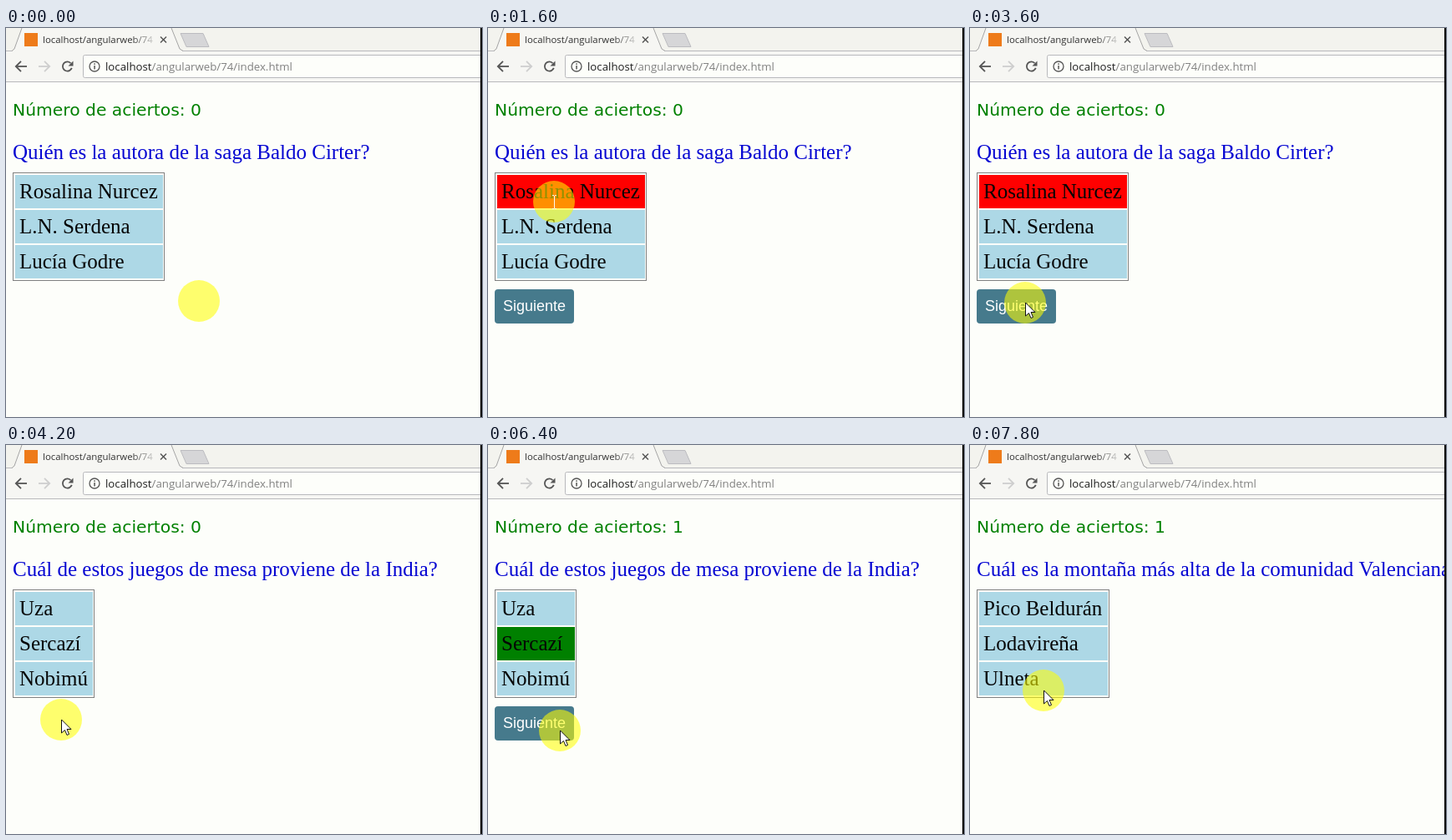
Write an HTML page with a canvas that moves like this. It is 570 px wide and 466 px high and loops after 8 s.

```html
<!DOCTYPE html>
<html lang="es">
<head>
<meta charset="utf-8">
<title>Quiz</title>
<style>
html, body { margin: 0; width: 100%; height: 100%; overflow: hidden; background: #fdfefa; }
canvas { display: block; width: 570px; height: 466px; }
</style>
</head>
<body>
<canvas id="stage" width="570" height="466"></canvas>
<script>
const ctx = document.getElementById('stage').getContext('2d');
const LOOP = 8000, STEP = 200;
const PAGE = '#fdfefa', BAR = '#f6f6f3', STRIP = '#f3f3ee', CELL = '#add8e6';
const LINE = '#b8b8bc', ICON = '#555555';
const SERIF = '25px "Liberation Serif", "Times New Roman", serif';
const UI = '"Open Sans", "Noto Sans", sans-serif';

const quiz = [
  { from: 0, answered: 1400, pick: 0, color: '#ff0000', width: 182,
    ask: 'Quién es la autora de la saga Baldo Cirter?',
    options: ['Rosalina Nurcez', 'L.N. Serdena', 'Lucía Godre'] },
  { from: 4200, answered: 5800, pick: 1, color: '#008000', width: 98,
    ask: 'Cuál de estos juegos de mesa proviene de la India?',
    options: ['Uza', 'Sercazí', 'Nobimú'] },
  { from: 7000, answered: Infinity, pick: -1, width: 159,
    ask: 'Cuál es la montaña más alta de la comunidad Valenciana?',
    options: ['Pico Beldurán', 'Lodavireña', 'Ulneta'] }
];

// Pointer path: time, x, y
const path = [
  [0, 231, 327], [200, 200, 310], [600, 95, 244], [1000, 92, 240],
  [1400, 79, 208], [2200, 79, 208], [2800, 66, 329], [4200, 66, 329],
  [5000, 77, 250], [5800, 77, 250], [6000, 86, 358], [6200, 86, 358],
  [6400, 86, 342], [7200, 86, 342], [7800, 88, 294], [8000, 88, 294]
];

function pointerAt(t) {
  let i = 0;
  while (i < path.length - 2 && t >= path[i + 1][0]) i++;
  const [t0, x0, y0] = path[i], [t1, x1, y1] = path[i + 1];
  const k = (t - t0) / (t1 - t0), e = k * k * (3 - 2 * k);
  return [x0 + (x1 - x0) * e, y0 + (y1 - y0) * e];
}

function rect(x, y, w, h, color) {
  ctx.fillStyle = color;
  ctx.fillRect(x, y, w, h);
}

function text(str, x, y, font, color) {
  ctx.font = font;
  ctx.fillStyle = color;
  ctx.fillText(str, x, y);
}

function shape(points, fill, stroke, closed = true, width = 1) {
  ctx.beginPath();
  points.forEach(([x, y]) => ctx.lineTo(x, y));
  if (closed) ctx.closePath();
  if (fill) { ctx.fillStyle = fill; ctx.fill(); }
  if (stroke) { ctx.strokeStyle = stroke; ctx.lineWidth = width; ctx.stroke(); }
}

function arc(x, y, r, a, b, color, width) {
  ctx.beginPath();
  ctx.arc(x, y, r, a, b);
  ctx.strokeStyle = color;
  ctx.lineWidth = width;
  ctx.stroke();
}

function navArrow(x, y, dir, color) {
  shape([[x - 6 * dir, y], [x + 7 * dir, y]], null, color, false, 1.8);
  shape([[x, y - 6.2], [x - 6.2 * dir, y], [x, y + 6.2]], null, color, false, 1.8);
}

function drawBrowser() {
  rect(0, 0, 570, 28, STRIP);
  rect(0, 28, 570, 37, BAR);
  rect(0, 27, 570, 1, LINE);
  shape([[7, 28], [10, 25], [19, 0], [198, 0], [208, 25], [212, 28]], BAR);
  shape([[7, 27.5], [10, 25], [19, 0]], null, '#a4a4a4', false);
  shape([[198, 0], [208, 25], [212, 27.5]], null, '#a4a4a4', false);
  shape([[209, 6.5], [236, 6.5], [243, 22.5], [216, 22.5]], '#d6d6d8', '#bcbcc0');

  rect(22, 6, 16, 16, '#ee7b1a');
  const fade = ctx.createLinearGradient(150, 0, 178, 0);
  fade.addColorStop(0, '#303030');
  fade.addColorStop(1, '#d6d6d4');
  text('localhost/angularweb/74', 44, 18, '11.4px ' + UI, fade);
  shape([[185, 10.5], [192, 17.5]], null, ICON, false, 1.5);
  shape([[192, 10.5], [185, 17.5]], null, ICON, false, 1.5);

  navArrow(18, 46, 1, ICON);
  navArrow(46, 46, -1, '#cecece');
  arc(73.5, 46, 5.6, 0.35, 5.5, ICON, 1.8);
  shape([[80.5, 39.5], [80.5, 45.5], [74.5, 45.5]], ICON);

  ctx.beginPath();
  ctx.roundRect(92.5, 32.5, 490, 27, 2);
  ctx.fillStyle = PAGE;
  ctx.fill();
  ctx.strokeStyle = LINE;
  ctx.lineWidth = 1;
  ctx.stroke();
  arc(106, 46, 6, 0, 7, ICON, 1.3);
  rect(105.3, 45, 1.5, 4.5, ICON);
  rect(105.3, 42.3, 1.5, 1.6, ICON);

  const font = '13.25px ' + UI;
  text('localhost', 119, 51, font, '#202020');
  text('/angularweb/74/index.html', 119 + ctx.measureText('localhost').width, 51, font, '#808080');
  rect(0, 64, 570, 1, LINE);
}

function drawQuiz(t) {
  const item = quiz.findLast(q => t >= q.from);
  const done = t >= item.answered;
  const score = t >= quiz[1].answered ? 1 : 0;

  text('Número de aciertos: ' + score, 8, 105, '20.3px "DejaVu Sans", sans-serif', '#008000');
  text(item.ask, 8, 157, SERIF, '#0505d2');

  ctx.strokeStyle = '#808080';
  ctx.lineWidth = 1;
  ctx.strokeRect(8.5, 173.5, item.width - 1, 129);
  item.options.forEach((option, i) => {
    const y = 176 + i * 42;
    rect(11, y, item.width - 5, 40, done && i === item.pick ? item.color : CELL);
    text(option, 16, y + 28, SERIF, '#050505');
  });

  if (done) {
    ctx.beginPath();
    ctx.roundRect(8, 313, 95, 41, 4);
    ctx.fillStyle = '#467a8c';
    ctx.fill();
    text('Siguiente', 18, 339, '18px "Liberation Sans", Arial, sans-serif', '#ffffff');
  }
}

function drawPointer(t) {
  const [x, y] = pointerAt(t);
  ctx.beginPath();
  ctx.arc(x, y, 25, 0, 2 * Math.PI);
  ctx.fillStyle = 'rgba(255, 255, 0, 0.56)';
  ctx.fill();
  if (t < STEP) return;
  if (y < 285 && x < 190) {
    rect(x, y - 7, 1, 15, '#fafaf0');
    for (const dy of [-8, 8]) {
      rect(x - 2, y + dy, 2, 1, '#fafaf0');
      rect(x + 1, y + dy, 2, 1, '#fafaf0');
    }
    return;
  }
  const tip = [[0, 0], [0, 16], [4, 12.5], [6.5, 18.5], [9, 17.4], [6.5, 11.5], [11.5, 11.5]];
  shape(tip.map(([a, b]) => [x + 0.5 + a, y + b]), '#ffffff', '#111111');
}

function draw(now) {
  const t = Math.floor((now % LOOP) / STEP) * STEP;
  rect(0, 0, 570, 466, PAGE);
  drawBrowser();
  drawQuiz(t);
  drawPointer(t);
  rect(568, 0, 2, 466, '#0c0c0c');
}

const start = performance.now();
function tick() {
  draw(performance.now() - start);
  requestAnimationFrame(tick);
}
tick();
</script>
</body>
</html>
```
